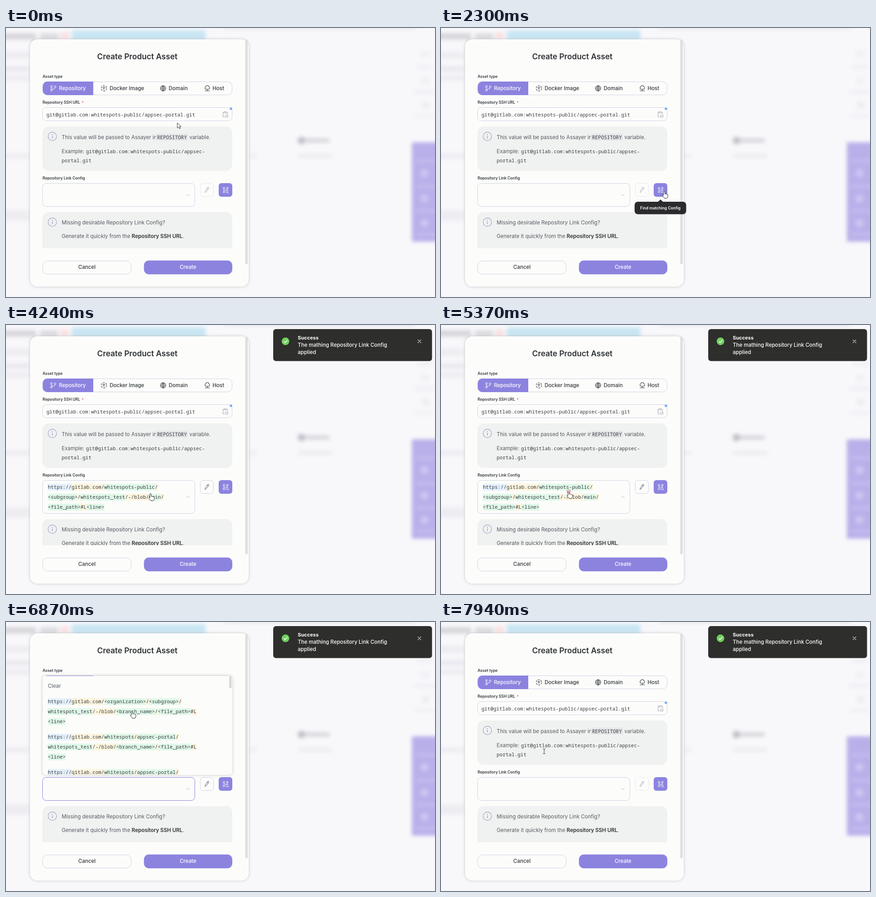
Animation of 944x593 px, one loop 8000 ms. Source, as an HTML page:

```html
<!DOCTYPE html>
<html lang="en">
<head>
<meta charset="utf-8">
<title>Create Product Asset</title>
<style>
  html, body { margin: 0; width: 100%; height: 100%; overflow: hidden; background: #f8f8fb; }
  svg { display: block; width: 944px; height: 593px; }
  text { font: 400 11.5px Inter, sans-serif; fill: #555a60; white-space: pre; }
  .title { font-size: 17.2px; font-weight: 600; fill: #2d3132; }
  .label { font-size: 8.5px; font-weight: 600; fill: #363a3e; }
  .tab { font-weight: 500; fill: #34383c; }
  .white { font-weight: 500; fill: #fff; }
  .strong { font-weight: 600; fill: #2d3132; }
  .head { font-size: 11px; font-weight: 700; fill: #fff; }
  .tip { font-size: 8.6px; font-weight: 600; fill: #fff; }
  .code { font: 400 10.92px "Noto Sans Mono", monospace; fill: #3a3e42; }
  .mid { text-anchor: middle; }
  .line { fill: none; stroke-linecap: round; stroke-linejoin: round; }
  .blur { filter: blur(4px); }
  .shadow { filter: drop-shadow(0 0 3px #0003); }
</style>
</head>
<body>
<svg id="stage" viewBox="0 0 944 593"></svg>
<script>
const PURPLE = '#8c83df', BORDER = '#d1d0e2', PAPER = '#fcfdfb', PANEL = '#f0f2f1';
const CHAR = 10.92 * 0.6;

const rect = (x, y, w, h, r, fill, extra = '') =>
  `<rect x="${x}" y="${y}" width="${w}" height="${h}" rx="${r}" fill="${fill}" ${extra}/>`;
const box = (x, y, w, h, r, extra = '') =>
  rect(x, y, w, h, r, PAPER, `stroke="${BORDER}" ${extra}`);
const text = (x, y, str, cls = '') =>
  `<text x="${x}" y="${y}" class="${cls}">${str.replace(/</g, '&lt;')}</text>`;
const path = (d, stroke, width = 1, extra = '') =>
  `<path class="line" d="${d}" stroke="${stroke}" stroke-width="${width}" ${extra}/>`;
const circle = (x, y, r, fill, extra = '') =>
  `<circle cx="${x}" cy="${y}" r="${r}" fill="${fill}" ${extra}/>`;
const ring = (x, y, r, stroke, width = 1, extra = '') =>
  circle(x, y, r, 'none', `stroke="${stroke}" stroke-width="${width}" ${extra}`);
const group = (id, body) => `<g id="${id}">${body}</g>`;
const clipped = (id, x, y, w, h, r, body) =>
  `<clipPath id="${id}">${rect(x, y, w, h, r, '#000')}</clipPath><g clip-path="url(#${id})">${body}</g>`;

// A URL template line with each part on its own tint.
function urlLine(x, y, str) {
  let column = 0, tints = '';
  for (const part of str.match(/https:\/\/|gitlab\.com\/|\/-\/blob\/|#L|\/|[^/#]+/g)) {
    const tint = part === 'https://' ? '#e4f1fd' : /^(gitlab|\/|#)/.test(part) ? '#fdf4de' : '#e0f8e9';
    tints += rect(x + column * CHAR, y - 11, part.length * CHAR, 15, 0, tint);
    column += part.length;
  }
  return tints + text(x, y, str, 'code');
}
const urlLines = (y, lines) => lines.map((s, i) => urlLine(92, y + i * 22, s)).join('');

const info = y => ring(102, y, 9.3, '#a0a1c6', 1.2) +
  path(`M102 ${y - 1}v5`, '#8f90b8', 1.2) + circle(102, y - 4, .9, '#8f90b8');

const backdrop = () => rect(0, 0, 944, 593, 0, '#f8f8fb') +
  `<g class="blur">` +
  [[145, 5, 294, 22, '#c8e5f3'], [-8, 12, 74, 13, '#d4d4d9'], [75, 12, 40, 13, '#d9d9de'],
   [119, 10, 20, 14, '#f9dfe0'],
   [-8, 53, 60, 14, '#ececf1'], [-8, 84, 60, 12, '#e8e8ee'], [-8, 104, 60, 12, '#ececf1'],
   [-8, 277, 60, 10, '#ebebf0'], [-8, 402, 60, 22, '#ececf1'], [530, 278, 22, 8, '#eeeef3'],
   [480, -4, 420, 6, '#e4e4ea'], [657, 244, 55, 8, '#d2d2d8'], [643, 278, 74, 8, '#ebebf0'],
   [912, 50, 20, 14, '#f0f0f5'], [904, 82, 34, 7, '#eeeef4'], [914, 110, 17, 13, '#eeeef4'],
   [897, 137, 47, 7, '#eeeef4'], [916, 163, 15, 14, '#ebebf1'], [900, 191, 42, 7, '#f0f0f5'],
   [893, 252, 60, 219, '#b9b0ea'], [902, 290, 50, 6, '#c5bdee'], [902, 346, 50, 6, '#c5bdee'],
   [902, 400, 50, 6, '#c5bdee'], [902, 452, 50, 6, '#c5bdee']]
    .map(([x, y, w, h, c]) => rect(x, y, w, h, 3, c)).join('') +
  circle(650, 248, 8, '#bdbdc5') +
  [320, 376, 430].map(y => circle(921, y, 9, '#cdc6f1')).join('') + `</g>`;

const tabs = () => box(80.5, 118.5, 417, 29, 10) +
  `<path d="M192 118v30H91a10 10 0 0 1-10-10v-10a10 10 0 0 1 10-10z" fill="${PURPLE}"/>` +
  [[100, 129], [100, 137], [108, 129.5]].map(([x, y]) => ring(x, y, 2, '#fff')).join('') +
  path('M100 131v4M108 131.5q0 3-4 3.2-3 0-4 1', '#fff') +
  text(116.5, 136.5, 'Repository', 'white') +
  ring(215.5, 133, 6, '#34383c', 1.1, 'stroke-dasharray="4.2 2.08"') +
  path('M213 131.5l2.5-1.5 2.5 1.5-2.5 1.5zM215.5 133v3', '#34383c') +
  text(228, 136.5, 'Docker Image', 'tab') +
  ring(345.7, 133, 6, '#34383c') +
  path('M339.7 133h12M345.7 127v12M345.7 127q-5.5 6 0 12M345.7 127q5.5 6 0 12M341 129.8h9.4M341 136.2h9.4', '#34383c', .8) +
  text(358, 136.5, 'Domain', 'tab') +
  path('M440 135a3 3 0 0 1-.5-5.5a3.6 3.6 0 0 1 7 0a3 3 0 0 1-.5 5.5zM443 135v3M438 138.5h10', '#34383c', 1.1) +
  text(454.5, 136.5, 'Host', 'tab');

const urlField = () => text(80.5, 167, 'Repository SSH URL', 'label') +
  `<text x="166.5" y="168" class="label" style="fill:#e25563">*</text>` +
  box(80.5, 175.5, 417, 29, 8) + circle(495, 178, 2.8, '#78aaf4') +
  text(89, 195, 'git@gitlab.com:whitespots-public/appsec-portal.git', 'code') +
  path('M480 186h-2.5v10h4M485 186h2.5v4M480 184.5h5v2.5h-5zM484 192h4.5v4.5h-4.5z', '#a2a3b2');

const hint = () => rect(80, 217, 418, 98, 14, PANEL) + info(239) +
  text(122.5, 245, 'This value will be passed to Assayer in') +
  rect(330, 233, 70, 15, 3, '#e3e5e8') + text(332.5, 244.5, 'REPOSITORY', 'code') +
  text(403.5, 245, 'variable.') + text(122.5, 276, 'Example:') +
  text(176, 276, 'git@gitlab.com:whitespots-public/appsec-', 'code') +
  text(122.5, 295.5, 'portal.git', 'code');

const select = () => text(80.5, 334, 'Repository Link Config', 'label') +
  box(80.5, 342.5, 335, 51, 8, 'id="field"') +
  path('M397 366.5l3.3 3.3 3.3-3.3', '#b4b5c0', 1, 'id="chevron"') +
  group('value', urlLines(361, ['https://gitlab.com/whitespots-public/',
    '<subgroup>/whitespots_test/-/blob/main/', '<file_path>#L<line>'])) +
  group('pencil', box(427.5, 342.5, 29, 29, 6) +
    path('M438 362.5l.8-3.5 5-7.6q1.5-1 2.8.8l-5 7.6zM442.7 353l2.8 1.8', '#5c5f68')) +
  rect(468, 342, 30, 30, 6, PURPLE) +
  [[479.5, 353], [487, 353], [479.5, 361.5]].map(([x, y]) => ring(x, y, 1.9, '#fff')).join('') +
  ring(486.3, 360.5, 2.5, '#fff') +
  path('M479.5 355v4.5M481.5 357.2h2.5M487 355v2.5M488.3 362.5l1.7 1.7', '#fff');

const missing = () => clipped('scrollArea', 60, 400, 460, 85.5, 0, group('missing',
  rect(80, 406, 418, 110, 14, PANEL) + info(428) +
  text(122.5, 433, 'Missing desirable Repository Link Config?') +
  `<text x="122.5" y="463">Generate it quickly from the <tspan class="strong">Repository SSH URL</tspan>.</text>`));

const buttons = () =>
  box(80.5, 513.5, 195, 29, 11) + text(178.2, 531, 'Cancel', 'mid tab') +
  rect(303.5, 512.5, 194.5, 30.5, 11, PURPLE) + text(400.5, 531, 'Create', 'mid white');

const dropdown = () => rect(80.5, 118.5, 417.5, 218.5, 7, PAPER, 'class="shadow"') +
  path('M90 118.5H192', PURPLE) +
  clipped('list', 81, 119, 417, 218, 6, rect(81, 119, 409, 39, 0, '#f3f4f3', 'id="hover"') +
    text(92, 145, 'Clear') +
    [['<organization>/<subgroup>', 179], ['whitespots/appsec-portal', 257], ['whitespots/appsec-portal', 335]]
      .map(([owner, y]) => urlLines(y, [`https://gitlab.com/${owner}/`,
        'whitespots_test/-/blob/<branch_name>/<file_path>#L', '<line>'])).join('')) +
  rect(491, 119.5, 5.5, 26.5, 2, '#d6dbda');

const tooltip = () => rect(426, 383, 113.5, 27.5, 7, '#2b2b2d') +
  `<path d="M477 383.5l6-5.5 6 5.5z" fill="#2b2b2d"/>` +
  text(482.8, 399.7, 'Find matching Config', 'tip mid');

const toast = () => rect(588, 9, 349.5, 70.5, 6, '#2e2e2c') +
  circle(615, 36, 8.4, '#6fcf5d') + path('M611.3 36.3l2.7 2.7 5-5.6', '#fff', 1.5) +
  text(642, 31.5, 'Success', 'head') +
  text(642, 48, 'The mathing Repository Link Config', 'white') + text(642, 64, 'applied', 'white') +
  path('M906.3 32.5l7 7m0-7l-7 7', '#c9c9c9', 1.1);

const pointers = () =>
  group('arrow', `<path d="M0 0V11.5L2.8 9 4.8 13 6.8 12 5 8.3H8.2Z" fill="#fff" stroke="#33343a"/>`) +
  group('hand', `<path d="M-1.5 .5Q0-1.2 1.4.5V6Q2.6 4.8 3.8 6.2 5.2 5.2 6.2 6.8 8.5 6.2 8.3 8.5V11Q8 13.5 6.5 15.3H.5Q-1 12.5-3.6 9.8-4.2 7.5-1.5 8.8Z" fill="#fff" stroke="#2b2c30"/>`) +
  group('beam', path('M-2.5-5.5Q0-5.5 0-4.5Q0-5.5 2.5-5.5M0-4.5V4.5M-2.5 5.5Q0 5.5 0 4.5Q0 5.5 2.5 5.5', '#33343a')) +
  group('click', ring(0, 0, 3.5, '#e0596a', 1.2));

document.getElementById('stage').innerHTML = backdrop() +
  rect(53, 25, 481, 545, 16, PAPER, 'class="shadow"') +
  rect(526.5, 26, 5.5, 495, 2.5, '#dbe0df', 'id="scrollbar"') +
  text(289, 69, 'Create Product Asset', 'title mid') +
  text(80.5, 110, 'Asset type', 'label') + tabs() + urlField() + hint() + select() +
  missing() + buttons() + group('dropdown', dropdown()) + group('tooltip', tooltip()) +
  group('toast', toast()) + group('pointer', pointers());

const LOOP = 8000, APPLIED = 3200, OPENED = 5440, CLEARED = 7620;
const CLICKS = [2520, 5360, 7560];
// time, x, y of the pointer tip
const ROUTE = [[0, 377, 209], [1700, 486, 356], [2200, 491, 360], [3060, 491, 360], [3340, 430, 341],
  [4040, 318, 372], [4300, 318, 372], [5240, 281, 367], [5460, 281, 367], [6280, 433, 254],
  [6460, 433, 254], [7280, 123, 140], [7620, 123, 140], [7940, 227, 285]];

const el = id => document.getElementById(id);
const show = (id, on) => { el(id).style.display = on ? '' : 'none'; };
const ramp = (t, from, to) => Math.min(1, Math.max(0, (t - from) / (to - from)));
const smooth = p => p * p * (3 - 2 * p);
const between = (t, from, to) => t >= from && t < to;

function pointerAt(t) {
  const i = ROUTE.findIndex(([time]) => time > t);
  if (i < 0) return ROUTE[ROUTE.length - 1].slice(1);
  const [t0, x0, y0] = ROUTE[i - 1], [t1, x1, y1] = ROUTE[i];
  const p = smooth(ramp(t, t0, t1));
  return [x0 + (x1 - x0) * p, y0 + (y1 - y0) * p];
}

function pointerKind(x, y, open, editable) {
  const inside = (l, t, r, b) => x >= l && x <= r && y >= t && y <= b;
  if (open && inside(81, 118, 498, 337)) return 'hand';
  if (inside(468, 342, 498, 372) || inside(81, 342, 416, 393)) return 'hand';
  if (editable && inside(425, 340, 459, 375)) return 'hand';
  return inside(122, 230, 460, 302) ? 'beam' : 'arrow';
}

function draw(t) {
  const filled = between(t, APPLIED, OPENED), open = between(t, OPENED, CLEARED);
  const drop = filled ? 22 : 0;
  show('value', filled);
  show('dropdown', open);
  el('field').setAttribute('height', 51 + drop);
  el('field').setAttribute('stroke', open ? PURPLE : BORDER);
  el('chevron').setAttribute('transform',
    open ? 'matrix(1 0 0 -1 0 736.4)' : `translate(0 ${drop / 2})`);
  el('missing').setAttribute('transform', `translate(0 ${drop})`);
  el('scrollbar').setAttribute('height', filled ? 479.5 : 495);
  el('pencil').style.opacity = filled || open ? 1 : .5;

  el('tooltip').style.opacity = ramp(t, 1800, 1950) * (1 - ramp(t, 3380, 3530));
  const entry = ramp(t, APPLIED - 20, 3400);
  el('toast').style.opacity = 1 - (1 - entry) ** 1.6;
  el('toast').setAttribute('transform', `translate(0 ${18 * (1 - entry) ** 1.7})`);

  const [x, y] = pointerAt(t);
  el('pointer').setAttribute('transform', `translate(${x} ${y})`);
  const kind = pointerKind(x, y, open, filled || open);
  for (const id of ['arrow', 'hand', 'beam']) show(id, id === kind);
  show('click', CLICKS.some(c => between(t, c - 30, c + 80)));
  show('hover', x < 490 && y > 119 && y < 158);
}

const start = performance.now();
function tick() {
  draw((performance.now() - start) % LOOP);
  requestAnimationFrame(tick);
}
tick();
</script>
</body>
</html>
```
